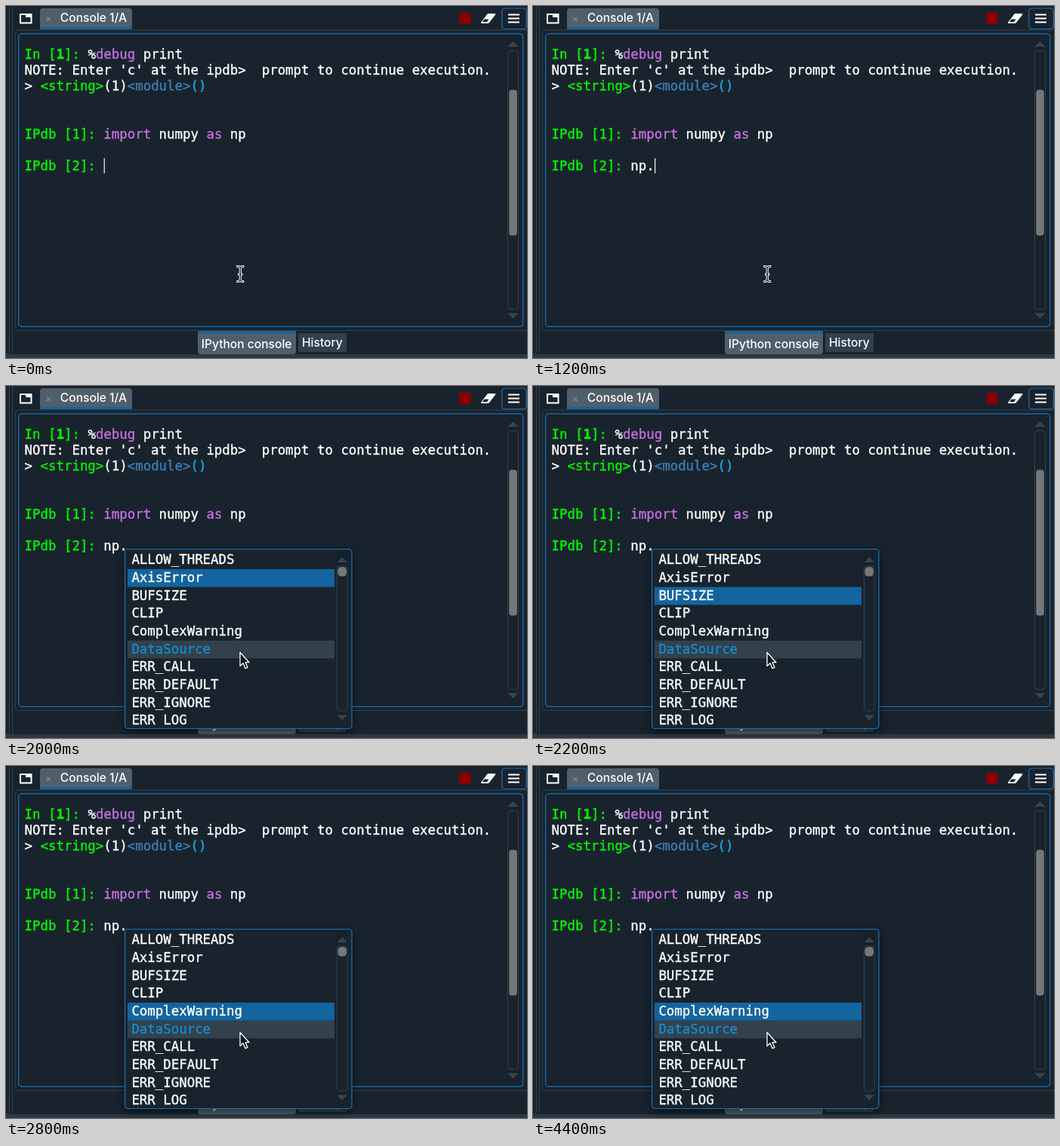
These frames come from a looping animation (690x467 px, 4600 ms). An HTML page:

```html
<!DOCTYPE html>
<html lang="en">
<head>
<meta charset="utf-8">
<title>Console completion</title>
<style>
  html, body { margin: 0; width: 100%; height: 100%; overflow: hidden; background: #19232d; }
  svg { display: block; width: 690px; height: 467px; }
  text { white-space: pre; fill: #fff; }
  .code { font: 17.4px "DejaVu Sans Mono", monospace; }
  .code tspan { fill: var(--ink); stroke: var(--ink); stroke-width: .35; --ink: #fff; }
  .ui { font: 500 15.6px Inter, sans-serif; }
  .code .g { --ink: #00fa00; }
  .code .k { --ink: #c670e0; }
  .code .m { --ink: #3a7fb8; }
  .code .p { --ink: #19b0ee; }
  .code .hover { --ink: #148cd2; }
  .b { font-weight: bold; }
  .edge { fill: none; stroke: #32414b; }
  .focus { fill: #19232d; stroke: #1a72bb; stroke-width: 1.2; }
  .arrow { fill: #36454f; }
  .thumb { fill: #757779; }
  #popup > .focus { filter: drop-shadow(0 4px 6px rgba(0, 0, 0, .5)); }
</style>
</head>
<body>
<svg viewBox="0 0 690 467">
  <rect width="690" height="467" fill="#19232d"/>

  <!-- window frame -->
  <path class="edge" d="M4.5 0V458q0 4-4.5 4M8.5 0V462M690 32H16q-3.500 0-3.500 4V426q0 4.500 4 4.500H690"/>
  <rect y="462" width="690" height="5" fill="#2c3945"/>

  <!-- toolbar -->
  <path d="M19 11H33.500V22.500H19Z" fill="none" stroke="#fff" stroke-width="2"/>
  <path d="M26 10H34V15H26Z" fill="#fff"/>
  <path d="M45 31V7q0-4 4-4H163q4 0 4 4V31Z" fill="#505f69"/>
  <rect x="45" y="28" width="122" height="3" fill="#1464a0"/>
  <path d="M53.500 15l5 5m0-5l-5 5" stroke="#7e8a93" stroke-width="1.2"/>
  <text class="ui" x="71.800" y="21">Console 1/A</text>
  <rect x="600.500" y="9" width="15" height="15" fill="#8b0000"/>
  <path d="M638 10H647.500q1.500 0 .7 1.500L640 22q-.8 1-2 1H630q-1.500 0-.7-1.500Z" fill="#fff"/>
  <path d="M633.500 17.500H639.500L637 21.200H631Z" fill="#19232d"/>
  <rect class="focus" x="656.800" y="3" width="32.500" height="27.500" rx="4"/>
  <path d="M665 11.500H680M665 16.500H680M665 21.500H680" stroke="#fff" stroke-width="2.200"/>

  <!-- console -->
  <rect class="focus" x="16.700" y="36.900" width="668" height="388.400" rx="4"/>
  <rect class="edge" x="664.500" y="59.500" width="14" height="343" rx="4"/>
  <rect class="thumb" x="666.300" y="111.300" width="10.500" height="193.200" rx="3.500"/>
  <path class="arrow" d="M664.500 54l7-7 7 7ZM664.500 407.500l7 7 7-7Z"/>
  <g id="lines" class="code"></g>
  <rect id="caret" y="202" width="1.300" height="20" fill="#e8eaec"/>

  <!-- bottom tabs -->
  <path d="M254 431H384V458q0 4-4 4H258q-4 0-4-4Z" fill="#505f69"/>
  <rect x="254" y="431" width="130" height="3.500" fill="#1464a0"/>
  <text class="ui" x="258.700" y="454.300">IPython console</text>
  <path d="M387 434H451V456q0 3-3 3H390q-3 0-3-3Z" fill="#32414b"/>
  <text class="ui" x="392" y="452">History</text>

  <!-- completion list -->
  <g id="popup">
    <rect class="focus" x="157.500" y="216.500" width="300.500" height="238" rx="4"/>
    <rect x="161" y="337.700" width="274" height="23.670" fill="#32414b"/>
    <rect id="selected" x="161" width="274" height="23.670" fill="#1464a0"/>
    <clipPath id="inside"><rect x="158" y="217" width="280" height="235"/></clipPath>
    <g id="items" class="code" clip-path="url(#inside)"></g>
    <path d="M437 219.500H449q3 0 3 3V238H437Z" fill="#15202a"/>
    <rect class="edge" x="438.500" y="238.500" width="13.500" height="192.500" rx="4"/>
    <rect class="thumb" x="439.500" y="240" width="11.500" height="12.500" rx="4.500"/>
    <path class="arrow" d="M438.500 234l6.800-7 6.800 7ZM438.500 436.500l6.800 7 6.800-7Z"/>
    <path d="M310 353.500V371.500L314 367.700 317 374.700 320 373.400 317.100 366.700H322Z"
          fill="#10161c" stroke="#fff" stroke-width="1.300" stroke-linejoin="round"/>
  </g>

  <!-- text pointer: dark core over a white halo -->
  <defs>
    <path id="beamShape" d="M307 345.500q3.300 0 3.300 3V362q0 3.500-3.300 3.500M313.600 345.500q-3.300 0-3.300 3V362q0 3.500 3.300 3.500M308.800 356H311.800"/>
  </defs>
  <g id="beam" fill="none" stroke-linecap="square">
    <use href="#beamShape" stroke="#fff" stroke-width="3.200"/>
    <use href="#beamShape" stroke="#10161c" stroke-width="1.200"/>
  </g>
</svg>
<script>
const LOOP = 4600;
const CHAR = 10.475, LEFT = 24.6, TOP = 70, LEADING = 21.2;
const ROW_TOP = 219.3, ROW = 23.67;
const $ = id => document.getElementById(id);

function addText(parent, x, y, runs) {
  const svg = name => document.createElementNS('http://www.w3.org/2000/svg', name);
  const text = svg('text');
  text.setAttribute('x', x);
  text.setAttribute('y', y);
  for (const [content, style = ''] of runs) {
    const span = svg('tspan');
    span.textContent = content;
    span.setAttribute('class', style);
    text.append(span);
  }
  return parent.appendChild(text);
}

const consoleLine = (row, ...runs) => addText($('lines'), LEFT, TOP + row * LEADING, runs);

consoleLine(0, ['In [', 'g'], ['1', 'g b'], [']: ', 'g'], ['%'], ['debug', 'k'], [' print']);
consoleLine(1, ["NOTE: Enter 'c' at the ipdb>  prompt to continue execution."]);
consoleLine(2, ['> '], ['<string>', 'g'], ['(1)'], ['<module>', 'm'], ['()', 'p']);
consoleLine(5, ['IPdb [1]: ', 'g'], ['import', 'k'], [' numpy '], ['as', 'k'], [' np']);
const typed = consoleLine(7, ['IPdb [2]: ', 'g'], ['']).lastChild;

const names = ['ALLOW_THREADS', 'AxisError', 'BUFSIZE', 'CLIP', 'ComplexWarning',
  'DataSource', 'ERR_CALL', 'ERR_DEFAULT', 'ERR_IGNORE', 'ERR_LOG'];
names.forEach((name, i) => {
  addText($('items'), 166.4, 236.4 + i * ROW, [[name, name === 'DataSource' ? 'hover' : '']]);
});

// [start ms, typed text, selected row or -1 while the list is closed]
const steps = [
  [0, '', -1], [600, 'n', -1], [800, 'np', -1], [1200, 'np.', -1],
  [1400, 'np.', 0], [2000, 'np.', 1], [2200, 'np.', 2], [2400, 'np.', 3], [2800, 'np.', 4]
];

const show = (id, on) => { $(id).style.display = on ? '' : 'none'; };
const origin = performance.now();
let current;

function draw() {
  const time = (performance.now() - origin) % LOOP;
  const step = steps.findLast(([start]) => start <= time);
  if (step !== current) {
    current = step;
    const [, input, row] = step;
    const open = row >= 0;
    typed.textContent = input;
    $('caret').setAttribute('x', LEFT + (10 + input.length) * CHAR + 0.2);
    $('selected').setAttribute('y', ROW_TOP + Math.max(row, 0) * ROW);
    show('popup', open);
    show('caret', !open);
    show('beam', !open);
  }
  requestAnimationFrame(draw);
}

draw();
</script>
</body>
</html>
```
